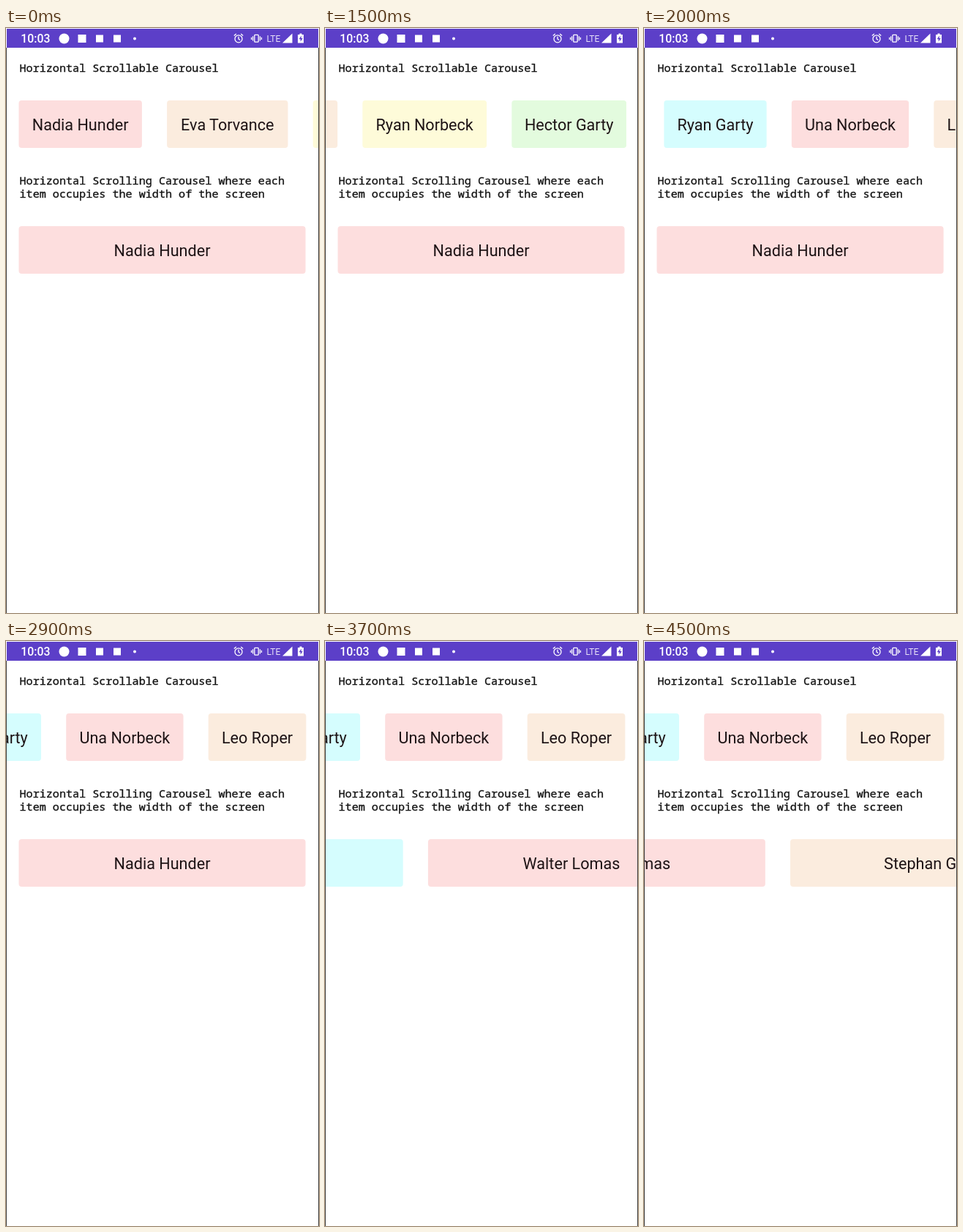
Animation, 428 px wide and 800 px high, one loop 4600 ms. Source, as an HTML page:

```html
<!DOCTYPE html>
<html lang="en">
<head>
<meta charset="utf-8">
<title>Carousels</title>
<style>
  html, body { margin: 0; width: 100%; height: 100%; overflow: hidden; background: #fff; }
  svg { display: block; width: 100vw; height: 100vh; }
  .name { font: 400 21.6px Roboto, sans-serif; fill: #1d1315; text-anchor: middle; }
  .head { font: 500 15.12px "Noto Sans Mono", monospace; fill: #141414; stroke: #141414; stroke-width: .35; }
  .clock { font: 500 15.8px Roboto, sans-serif; fill: #fff; }
  .net { font: 400 12px Roboto, sans-serif; fill: #e6e0f8; }
</style>
</head>
<body>
<svg viewBox="0 0 428 800" preserveAspectRatio="none">
  <rect width="428" height="800" fill="#fff"/>

  <text class="head" x="18.5" y="60">Horizontal Scrollable Carousel</text>
  <g id="free"></g>
  <text class="head" x="18.5" y="214">Horizontal Scrolling Carousel where each</text>
  <text class="head" x="18.5" y="232">item occupies the width of the screen</text>
  <g id="paged"></g>

  <path d="M.5 27V800M427.5 27V800" stroke="#444" fill="none"/>

  <!-- status bar -->
  <rect x="1" y="1" width="426" height="26" fill="#5c3fc8"/>
  <text class="clock" x="20.3" y="20">10:03</text>
  <g fill="#fff">
    <circle cx="79.5" cy="14.5" r="7"/>
    <rect x="98.5" y="9" width="11" height="11"/>
    <rect x="123" y="9.5" width="10" height="10"/>
    <rect x="147" y="9.5" width="10" height="10"/>
    <circle cx="176" cy="14.5" r="2"/>
    <path d="M391.5 7.5V20.5H378Z"/>
    <path d="M401.5 7.5h3v1.5h2.5v11.5h-8V9h2.5Z"/>
  </g>
  <path d="M403.7 10.5l-3 4.7h2v3.6l3-4.9h-2Z" fill="#5c3fc8"/>
  <g fill="none" stroke="#fff" stroke-width="1.3">
    <circle cx="318" cy="14.8" r="5"/>
    <path d="M318 11.8v3.2l2.2 1.5M311.8 10.6l3-2.6M324.2 10.6l-3-2.6"/>
    <rect x="339.8" y="9.4" width="5.4" height="9.8" rx=".8"/>
    <path d="M337.6 11.2v6.2M335.6 12.7v3.2M347.4 11.2v6.2M349.4 12.7v3.2"/>
  </g>
  <text class="net" x="356.5" y="18.7">LTE</text>
</svg>
<script>
const NS = 'http://www.w3.org/2000/svg';
const COLORS = ['#fddede', '#fbecde', '#fefbd9', '#e3fbde', '#d5fdfe'];
const LEFT = 17.5, GAP = 34.2, PAGE = 392.1;
const LOOP = 4600, STEP = 100;

const freeCards = [
  ['Nadia Hunder', 168.4], ['Eva Torvance', 165.4], ['Ryan Norbeck', 169.8],
  ['Hector Garty', 156.8], ['Ryan Garty', 140.3], ['Una Norbeck', 160.3], ['Leo Roper', 133.7]
];
const pagedCards = [
  'Nadia Hunder', 'Eva Torvance', 'Ryan Norbeck', 'Alan Hobb',
  'Ryan Garty', 'Walter Lomas', 'Stephan Garty'
].map(name => [name, PAGE]);

function add(parent, tag, attrs) {
  const node = document.createElementNS(NS, tag);
  for (const key in attrs) node.setAttribute(key, attrs[key]);
  return parent.appendChild(node);
}

function buildRow(id, cards, top) {
  const row = document.getElementById(id);
  let x = LEFT;
  cards.forEach(([name, width], i) => {
    add(row, 'rect', { x, y: top, width, height: 65, rx: 4, fill: COLORS[i % COLORS.length] });
    add(row, 'text', { class: 'name', x: x + width / 2, y: top + 41 }).textContent = name;
    x += width + GAP;
  });
  return row;
}

const free = buildRow('free', freeCards, 99);
const paged = buildRow('paged', pagedCards, 271);

// A swipe that slows down: 0 before a, 1 after b.
function swipe(t, a, b) {
  const u = Math.min(1, Math.max(0, (t - a) / (b - a)));
  return 1 - Math.pow(1 - u, 1.4);
}

function freeScroll(t) {
  return 475.5 * swipe(t, 1.12, 1.7) + 431.5 * swipe(t, 1.7, 2.2);
}

// One hard fling: the finger speeds the row up, then friction takes over.
function pagedScroll(t) {
  const start = 2.954, release = 3.1;
  const glide = s => 2426 - 1199.5 * Math.exp(-2.636 * (s - 3.3));
  if (t <= start) return 0;
  if (t >= release) return glide(t);
  return glide(release) * Math.pow((t - start) / (release - start), 2);
}

function render(ms) {
  const t = Math.floor((ms % LOOP) / STEP) * STEP / 1000;
  free.setAttribute('transform', `translate(${-freeScroll(t)} 0)`);
  paged.setAttribute('transform', `translate(${-pagedScroll(t)} 0)`);
}

const began = performance.now();
function tick() {
  render(performance.now() - began + 12);
  requestAnimationFrame(tick);
}
tick();
</script>
</body>
</html>
```
